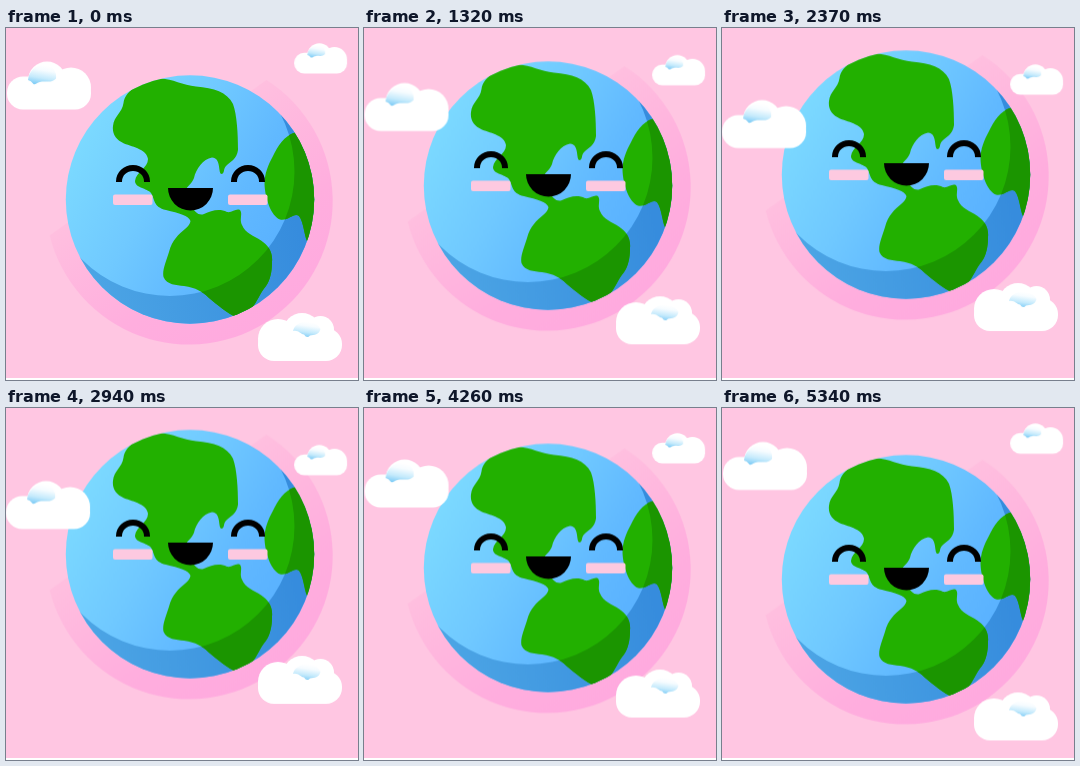
Animation, 352 px wide and 352 px high, one loop 5370 ms. Source, as an HTML page without scripts:

```html
<!DOCTYPE html>
<html lang="en">
<head>
<meta charset="utf-8">
<title>Happy Earth</title>
<style>
  html, body { margin: 0; width: 100%; height: 100%; overflow: hidden; background: #fff; }
  svg { display: block; width: 100vw; height: 100vh; }
  .drift { animation: drift 5.37s linear infinite; }
  .earth { --y: -28.1px; }
  .left { --x: -1px; --y: 43.7px; }
  .right { --y: 24px; }
  .low { animation-name: drift-late; --y: -42.5px; }
  @keyframes drift { 50% { transform: translate(var(--x, 0px), var(--y)); } }
  @keyframes drift-late { 62.6% { transform: translate(0px, var(--y)); } }
</style>
</head>
<body>
<svg viewBox="0 0 352 352" preserveAspectRatio="none">
  <defs>
    <linearGradient id="sea" gradientUnits="userSpaceOnUse" x1="65" y1="120" x2="260" y2="235">
      <stop offset="0" stop-color="#7cdaff"/>
      <stop offset=".42" stop-color="#70c9ff"/>
      <stop offset=".75" stop-color="#61b9ff"/>
      <stop offset="1" stop-color="#5ab2ff"/>
    </linearGradient>
    <linearGradient id="deep" gradientUnits="userSpaceOnUse" x1="80" y1="240" x2="290" y2="190">
      <stop offset="0" stop-color="#4ca5e5"/>
      <stop offset="1" stop-color="#368cdd"/>
    </linearGradient>
    <linearGradient id="glow" gradientUnits="userSpaceOnUse" x1="152" y1="130" x2="267" y2="292">
      <stop offset="0" stop-color="#ffbfdf"/>
      <stop offset=".6" stop-color="#ffaede"/>
      <stop offset="1" stop-color="#ffaadf"/>
    </linearGradient>
    <linearGradient id="shade" x1=".25" y1="1" x2=".5" y2="0">
      <stop offset="0" stop-color="#7ccbf6"/>
      <stop offset=".35" stop-color="#c4eafc"/>
      <stop offset=".75" stop-color="#f6fcff"/>
      <stop offset="1" stop-color="#fff"/>
    </linearGradient>

    <clipPath id="globe"><circle cx="184" cy="171.5" r="124.2"/></clipPath>
    <path id="land" d="M155 50.500C166 51 177 57 190 58.500C208 60 221 64 227 76C231 87 232 106 232 122
      C231 131 224 134 220 138C217 141 219 146 215 146C212 143 215 130 206 129.500
      C197 131 190 141 188 150C186 156 180 159 179 163L186 178C188 184 193 188 198 186
      C205 183 213 180 221 184C226 185 230 180 234 182C237 186 233 191 236 197
      C239 205 248 208 255 212.500C262 217 267 224 266 234C266 244 264 252 260 258
      C254 265 251 274 246 280L232 290C220 285 212 277 203 270C196 263 190 260 178 258
      C170 257 161 257 157.500 249C156 242 160 234 163 224C166 212 173 206 179 201
      Q184 197 184.500 193C183 188 173 185 160 182C147 179 149 171 145 165
      C141 160 129 160 129 153C130 144 142 140 142 131C141 122 128 119 118 115.500
      C110 112 106 106 107 98C108 88 116 85 117.500 75C119 62 139 50 155 50.500Z
      M289 104.500C278 108 272 118 267 128C262 137 258.500 146 258.500 156C259 170 265 188 274 191.500
      C283 193 288 184 293 188C298 195 298 207 301 213L320 205V104.500Z"/>
    <clipPath id="coast"><use href="#land"/></clipPath>
    <path id="night" fill-rule="evenodd" d="M50 30H320V310H50ZM39.500 143.500a124.500 124.500 0 1 0 249 0a124.500 124.500 0 1 0-249 0Z"/>

    <path id="eye" d="M113 154v-.500a14 13.500 0 0 1 28 0v.500" fill="none" stroke="#000" stroke-width="6"/>
    <rect id="cheek" x="107" y="166.500" width="39.500" height="10.500" rx="2" fill="#fdc9e0"/>

    <g id="puffs" fill="#fff">
      <rect x="1" y="48.500" width="84" height="33" rx="16"/>
      <circle cx="41" cy="52.500" r="19"/>
      <circle cx="65" cy="59.500" r="20"/>
    </g>
    <g id="cloud">
      <use href="#puffs"/>
      <path d="M22 52C23 42 31 36 40 37C47 38 51 44 50 50.500C46 55 41 53 36 53.500C32 53.500 30 57 27.500 56Q25 52.500 22 52Z" fill="url(#shade)"/>
    </g>
  </defs>

  <rect width="352" height="350" fill="#ffc6e2"/>

  <g class="drift earth">
    <path d="M43.700 207.500L260.500 52A143.600 143.600 0 1 1 43.700 207.500Z" fill="url(#glow)"/>
    <g clip-path="url(#globe)">
      <rect x="50" y="40" width="270" height="270" fill="url(#sea)"/>
      <use href="#night" fill="url(#deep)"/>
      <use href="#land" fill="#22b000"/>
      <g clip-path="url(#coast)"><use href="#night" fill="#1b9500"/></g>
    </g>
    <use href="#cheek"/>
    <use href="#cheek" x="115"/>
    <use href="#eye"/>
    <use href="#eye" x="115"/>
    <path d="M162 160h45a22.500 22.500 0 0 1-45 0Z"/>
  </g>

  <g class="drift left"><use href="#cloud"/></g>
  <g class="drift right"><use href="#cloud" transform="translate(287.500 -5.800) scale(.63)"/></g>
  <g class="drift low">
    <use href="#puffs" transform="translate(337 251.500) scale(-1 1)"/>
    <circle cx="314.500" cy="301.500" r="13.500" fill="#fff"/>
    <path d="M287 303C293 302 294 306 298 306.500Q301 311 304 307.500C308 307 313 307 314.500 301C311 292 290 290 287 303Z" fill="url(#shade)"/>
  </g>
</svg>
</body>
</html>
```
